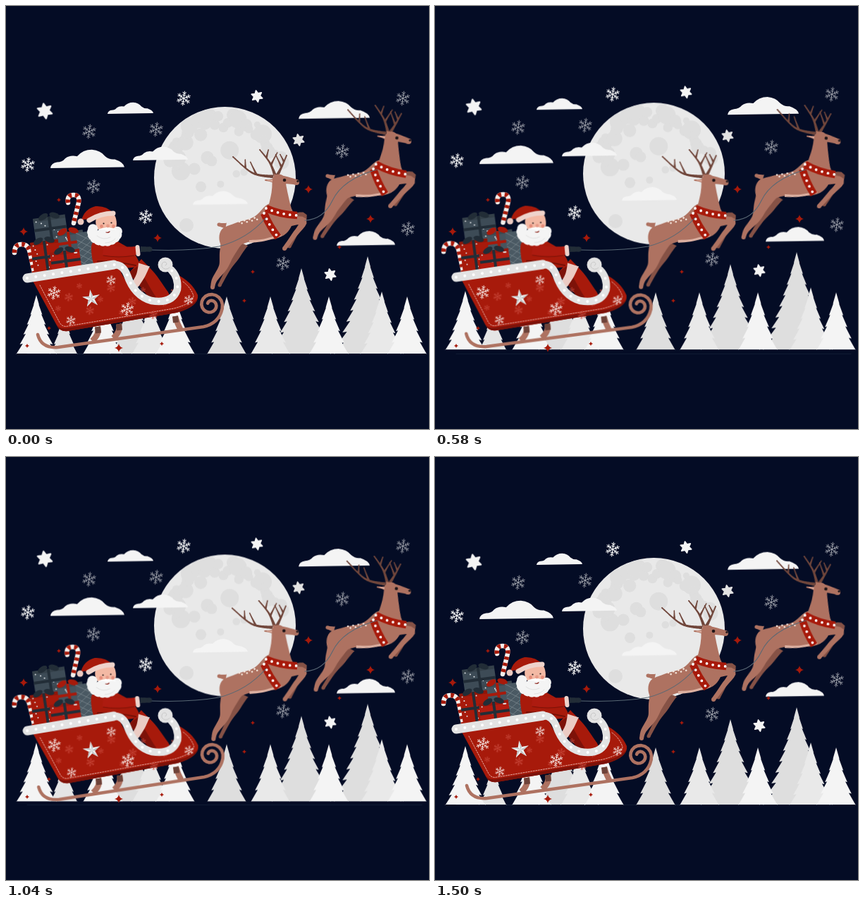
An HTML page that plays this animation: 600 by 600 pixels, repeating every 1540 ms.

```html
<!DOCTYPE html>
<html lang="en">
<head>
<meta charset="utf-8">
<title>Night sleigh ride</title>
<style>
html, body { margin: 0; width: 100%; height: 100%; overflow: hidden; background: #040c25; }
svg { display: block; }
</style>
</head>
<body>
<svg id="stage" width="600" height="600" viewBox="0 0 600 600" fill="none" stroke-linecap="round" stroke-linejoin="round"></svg>
<script>
const LOOP = 1540, SWING = 1500, GROUND = 494;
const RED = '#a71a0b', MAROON = '#7d1209', SLATE = '#3d4b56', INK = '#222d37';
const BROWN = '#ae7261', DARK = '#865246', PALE = '#dcb0a1', SNOW = '#f4f4f4', GREY = '#dedede';

let seed = 7;
const rnd = () => (seed = seed * 16807 % 2147483647) / 2147483647;
const repeat = (n, fn) => Array.from({ length: n }, (_, i) => fn(i)).join('');
const points = text => text.split(' ').map(p => p.split(',').map(Number));
const spread = (text, fn) => points(text).map((p, i) => fn(...p, i)).join('');

const shape = (d, fill) => `<path d="${d}" fill="${fill}"/>`;
const line = (d, color, w, extra = '') => `<path d="${d}" stroke="${color}" stroke-width="${w}" ${extra}/>`;
const band = (d, color, w) => line(d, color, w, 'stroke-linecap="butt"');
const beads = (d, r, gap) => line(d, '#fff', r * 2, `stroke-dasharray="0 ${gap}"`);
const dot = (x, y, r, fill) => `<circle cx="${x}" cy="${y}" r="${r}" fill="${fill}"/>`;
const poly = (pts, fill) => `<polygon points="${pts.map(p => p.map(v => v.toFixed(1))).join(' ')}" fill="${fill}"/>`;
const put = (id, x, y, s, extra) => `<use href="#${id}" transform="translate(${x} ${y}) scale(${s})" ${extra}/>`;

// Samples a smooth curve through the key points.
function curve(pts, closed) {
  const n = pts.length, out = [], steps = 6;
  const at = i => pts[closed ? (i + n) % n : Math.max(0, Math.min(n - 1, i))];
  for (let i = 0; i < (closed ? n : n - 1); i++)
    for (let k = 0; k < steps; k++) {
      const t = k / steps, [a, b, c, d] = [-1, 0, 1, 2].map(j => at(i + j));
      out.push([0, 1].map(m => b[m] + t * (c[m] - a[m] + t * (2 * a[m] - 5 * b[m] + 4 * c[m] - d[m] +
        t * (3 * (b[m] - c[m]) + d[m] - a[m]))) / 2));
    }
  return closed ? out : [...out, pts[n - 1]];
}
const blob = (text, fill) => poly(curve(points(text), true), fill);

// A tapering stroke, wide at its first point.
function limb(pts, w0, w1, fill) {
  const c = curve(typeof pts === 'string' ? points(pts) : pts), last = c.length - 1, left = [], right = [];
  c.forEach(([x, y], i) => {
    const [ax, ay] = c[Math.max(0, i - 1)], [bx, by] = c[Math.min(last, i + 1)];
    const half = (w1 + (w0 - w1) * (1 - i / last) ** 2) / 2, len = Math.hypot(bx - ax, by - ay);
    const nx = (ay - by) / len * half, ny = (bx - ax) / len * half;
    left.push([x + nx, y + ny]);
    right.unshift([x - nx, y - ny]);
  });
  return poly([...left, ...right], fill) + dot(...c[last], w1 / 2, fill);
}

// Alternating long and short rays.
const rays = (n, r, inner, turn) => repeat(n * 2, i => {
  const a = (i * 180 / n + turn) * Math.PI / 180, q = i % 2 ? inner : r;
  return `${q * Math.sin(a)},${-q * Math.cos(a)} `;
});

function tree(x, height, fill) {
  const right = [], left = [], tiers = Math.round(height / 15);
  for (let i = 1; i <= tiers; i++) {
    const f = i / tiers, y = GROUND - height * (1 - f), half = height * .34 * f ** 1.1;
    const notch = i < tiers ? half * .82 : half;
    right.push([x + half, y], [x + notch, y - 1]);
    left.unshift([x - notch, y - 1], [x - half, y]);
  }
  return poly([[x, GROUND - height], ...right, ...left], fill);
}

// A beam with two tines turned to one side.
function antler(text, side) {
  const c = curve(points(text)), color = '#70463b';
  return limb(c, 5, 1.8, color) + [.4, .7].map(u => {
    const i = Math.round(u * (c.length - 1)), [x, y] = c[i], [px, py] = c[i - 1];
    const a = Math.atan2(y - py, x - px) + side, len = 26 * (1.15 - u);
    return limb([[x, y], [x + len * Math.cos(a), y + len * Math.sin(a)]], 3.4, 1.5, color);
  }).join('');
}

const strapA = 'M366 294Q374 313 386 328', strapB = 'M369 287Q389 296 413 297';
const deer =
  limb('334,336 324,357 315,373 303,396', 20, 5, DARK) +
  limb('400,302 423,298 410,325 402,341', 12, 5, DARK) +
  antler('379,242 350,237 322,214', .9) + antler('382,241 374,222 360,204', .9) + antler('385,240 392,226 398,212', -.9) +
  limb('312,312 302,310', 9, 5, BROWN) +
  limb('388,294 388,268 387,248', 40, 19, BROWN) +
  blob('306,317 303,334 314,347 343,335 386,329 404,314 407,292 395,281 372,281 352,299 325,308', BROWN) +
  limb('345,334 366,332 389,325', 4, 3, PALE) +
  limb('320,332 313,352 308,370 296,388 293,399', 32, 6, BROWN) +
  limb('396,307 422,305 408,326 395,344', 15, 6, BROWN) +
  limb('380,247 397,247 412,250', 18, 8, BROWN) +
  limb('380,248 368,247', 7, 2, BROWN) + limb('378,248 371,247', 3, 1, PALE) +
  repeat(8, i => dot(331 + i * 3.6, 306 - i * .9 + i % 2 * 3, 1.3, '#f5e5dc')) +
  band(strapA, RED, 10.5) + band(strapB, RED, 10.5) + beads(strapA, 1.9, 8.8) + beads(strapB, 1.9, 8.8) +
  dot(395, 247, 2.3, '#201719') + dot(414, 248.5, 1.8, '#2c2022');

const defs = `<defs>
  <g id="flake">${repeat(6, i => `<path d="M0 0V-10M-2.2-8.5L0-6.3L2.2-8.5M-1.8-5.2L0-3.4L1.8-5.2" transform="rotate(${i * 60 + 8})"/>`)}</g>
  <g id="deer">${deer}</g>
  <polygon id="star" points="${rays(6, 9, 4.8, -10)}" stroke-width="2"/>
  <path id="spark" d="M0-10Q1.8-1.8 10 0Q1.8 1.8 0 10Q-1.8 1.8-10 0Q-1.8-1.8 0-10Z"/>
  <path id="cloud" d="M0 0Q1-7 9-8Q16-8 20-13Q26-18 36-16Q44-25 56-25Q68-24 74-16Q80-11 87-12Q99-8 100-1.5Z"/>
  <clipPath id="disc"><circle cx="310.5" cy="243.5" r="100"/></clipPath>
</defs>`;

// Dark seas strewn along an arc over the upper half, a few craters below.
const moon = dot(310.5, 243.5, 100.5, '#e9e9e9') + '<g clip-path="url(#disc)">' +
  repeat(34, i => {
    const a = Math.PI * (1.02 + i / 36), r = 62 + rnd() * 24;
    return dot(310 + r * Math.cos(a), 238 + r * Math.sin(a), 4 + rnd() * 10, GREY);
  }) +
  repeat(9, i => dot(262 + i * 9 + rnd() * 8, 200 + rnd() * 60, 4 + rnd() * 9, GREY)) + dot(256, 311, 10, GREY) + '</g>';

const forest =
  tree(82, 57, '#e5e5e5') +
  spread('180,96 419,122 513,139', (x, h) => tree(x, h, GREY)) +
  spread('205,78 313,82 375,82 533,89', (x, h, i) => tree(x, h, i === 1 ? GREY : '#e9e9e9')) +
  spread('43,84 137,82 240,82 458,82 569,82', (x, h) => tree(x, h, SNOW));

const sky =
  spread('252,131 31,225 198,299 393,365 563,131 213,175 118,178 124,256 477,206 570,316',
    (x, y, i) => put('flake', x, y, 1, `stroke="${SNOW}" stroke-width="${i < 3 ? 1.1 : .8}" opacity="${i < 3 ? 1 : .7}"`)) +
  moon +
  spread('55,149 356,128 415,190 460,381', (x, y, i) => {
    const c = i === 2 ? '#e2e2e2' : SNOW;
    return put('star', x, y, i ? .9 : 1.18, `fill="${c}" stroke="${c}"`);
  }) +
  spread('144,153,65 63,230,105 180,219,78 265,282,78 415,160,101 469,340,83',
    (x, y, w) => put('cloud', x, y, w / 100, `fill="${SNOW}"`)) +
  forest;

const sparks = spread('215,329 429,260 517,302 160,485 25,320 75,275 473,342 350,377 338,418 30,482 61,457 221,479',
  (x, y, i) => put('spark', x, y, i < 5 ? .6 : .31, `fill="${RED}"`));

// A tilted parcel with its ribbon, sprinkled dots and a bow on top.
function gift(x, y, w, h, fill, ribbon) {
  const bow = [-1, 1].map(s => `<ellipse cx="${s * 7}" cy="-4" rx="7.5" ry="4" transform="translate(${w / 2} 0) rotate(${s * 25})" fill="${ribbon}"/>`).join('');
  return `<g transform="translate(${x} ${y}) rotate(-8)">
    <rect width="${w}" height="${h}" fill="${fill}"/><rect width="${w}" height="5" fill="#000" opacity=".15"/>
    ${repeat(10, i => dot(4 + i * 17 % (w - 7), 5 + i * 11 % (h - 8), 1, '#dfe3e6'))}
    ${band(`M${w / 2} 0V${h}M0 ${h / 2}H${w}`, ribbon, 4)}${bow}</g>`;
}
const cane = d => line(d, '#f4efec', 6.5) + line(d, RED, 6.5, 'stroke-dasharray="4.5 4.5" stroke-linecap="butt"');

const gifts =
  cane('M88 279Q86 268 96 268Q105 268 103 279L96 308') + gift(38, 302, 46, 34, SLATE, INK) +
  cane('M12 350Q12 338 22 338Q32 338 34 350L41 382') + gift(67, 323, 42, 32, '#46545e', RED) + gift(34, 336, 40, 46, RED, INK) +
  `<g transform="translate(99 322) rotate(-8)"><rect width="26" height="48" fill="#4a5963"/>
   <svg width="26" height="48">${line(repeat(5, i => `M0 ${i * 10}l26 18M26 ${i * 10}l-26 18`), '#75828a', .8)}</svg></g>` +
  gift(62, 350, 42, 30, '#b11c10', INK);

const santa =
  limb('184,368 203,386 222,412', 24, 20, RED) + limb('180,374 196,396 208,414', 18, 9, MAROON) +
  blob('121,342 130,331 150,331 172,342 184,354 187,369 156,372 128,372', RED) +
  limb('196,367 191,382 184,394', 17, 11, '#ebcbc3') +
  line('M130 362Q158 362 184 368', '#731007', 2) +
  limb('138,345 160,348 184,347', 17, 12, '#ad1b10') + line('M138 354Q160 358 182 354', MAROON, 1) +
  line('M186.5 342L187.5 352', '#efd3cb', 6) + limb('191,345 199,345 204,345', 8, 7, INK) +
  blob('128,302 141,294 154,297 156,314 142,322 130,316', '#f3b9a4') +
  // beard
  repeat(11, i => {
    const a = Math.PI * (1.12 - i * .115);
    return dot(140 + 18 * Math.cos(a), 321 + 13 * Math.sin(a), 7, SNOW);
  }) +
  `<ellipse cx="142" cy="325" rx="16" ry="10" fill="${SNOW}"/>` + line('M129 326Q138 333 148 328M141 336Q150 336 155 330', GREY, .9) +
  [-1, 1].map(s => dot(144 + s * 5.5, 308 - s * .5, 1.1, '#231a1c') + dot(144 + s * 8.5, 312.5, 2.4, '#e58d7b') +
    limb(`144,316 ${144 + s * 6},316 ${144 + s * 12},317`, 5, 1, '#fff')).join('') +
  dot(144.5, 312, 2.4, '#e79a87') + line('M142 321Q145 322 147 320', '#8f2b22', 1.2) +
  // hat
  shape('M107 304Q111 288 127 284Q143 283 152 294L118 304Q113 301 107 304Z', RED) +
  line('M118 304Q134 294 152 294', '#eed3cb', 7) + dot(106, 306, 4.5, '#eccac1');

const scroll = repeat(28, i => {
  const a = .3 - i / 27 * 9.2, r = 17.5 - i * .48;
  return `L${290 + r * Math.cos(a)} ${424 + r * Math.sin(a)}`;
});
const leg = (x, y, side) =>
  band(`M${x} ${y}q3 11 ${side * 8} 20`, BROWN, 8) + band(`M${x} ${y}l1 9`, '#6d4239', 8);
const rim = 'M30 386L153 367Q166 366 172 382Q182 411 206 418Q236 423 243 402Q245 385 234 374';

const sleigh =
  leg(130, 455, -1) + leg(160, 451, -1) + leg(240, 440, 1) +
  line('M45 466Q50 486 74 484L280 455Q302 450 306.5 430' + scroll, BROWN, 4.6) +
  gifts + santa +
  shape('M38 390L160 371Q170 394 184 408Q205 424 230 418Q246 407 241 380Q264 391 272 410Q274 426 242 435L88 461Q77 463 72 453Z', RED) +
  shape('M72 453Q77 463 88 461L242 435Q268 428 272 415Q262 427 239 431L86 457Q77 458 72 453Z', MAROON) +
  line('M48 396L76 449Q80 456 88 454L238 429Q265 422 266 411Q262 399 251 391', '#eab9b2', .9, 'stroke-dasharray="2 1.6"') +
  repeat(12, i => put('flake', 74 + i * 15, 429 - i % 3 * 17 + i, i % 2 ? .6 : .4, 'stroke="#c9483b" stroke-width="1"')) +
  spread('68,407 172,430 149,389 92,446 259,417', (x, y, i) => put('flake', x, y, i < 2 ? .95 : .68, 'stroke="#f3dfdb" stroke-width="1"')) +
  `<g transform="translate(121 415) rotate(-8)"><polygon points="${rays(5, 13, 4.6, 0)}" fill="${SNOW}"/>` +
  repeat(5, i => `<path d="M0 0V-13L2.7-3.7Z" fill="#bfc2c4" transform="rotate(${i * 72})"/>`) + '</g>' +
  line(rim, '#e3e3e3', 10.5) + line('M30 386L153 367', '#e3e3e3', 13) + dot(226, 367, 10.5, '#e3e3e3') +
  line('M232 371Q226 376 221 370Q220 363 226 363Q230 366 226 368', '#c7c7c7', 1) + beads(rim, 2, 12.5);

const rope = line('M206 346Q262 348 302 341Q342 331 369 300M424 304Q450 303 463 276Q477 246 526 232', '#596874', 1.1);

document.getElementById('stage').innerHTML = defs +
  line('M30 493.5H590', '#101b33', 1) +
  `<g id="sky">${sky}</g>${sparks}
  <g id="lead"><use href="#deer" transform="translate(514.5 216) rotate(5.5) translate(-358 -279.5)"/></g>
  <g id="second"><use href="#deer"/></g>${rope}
  <g id="sleigh">${sleigh}</g>`;

// Evenly timed poses over one swing, then a short rest.
function play(id, poses, pivot = '0 0') {
  const el = document.getElementById(id), last = poses.length - 1;
  el.style.transformOrigin = pivot;
  const steps = poses.map((transform, i) => ({ transform, offset: i / last * SWING / LOOP }));
  el.animate([...steps, { transform: poses[last], offset: 1 }], { duration: LOOP, iterations: Infinity });
}
const sway = [0, 1, 0, -1, 0].map(v => `rotate(${v}deg)`);
play('sky', [0, -7.5, 0].map(y => `translateY(${y}px)`));
play('sleigh', sway, '200px 372px');
play('second', sway, '360px 300px');
play('lead', sway, '515px 238px');
</script>
</body>
</html>
```
